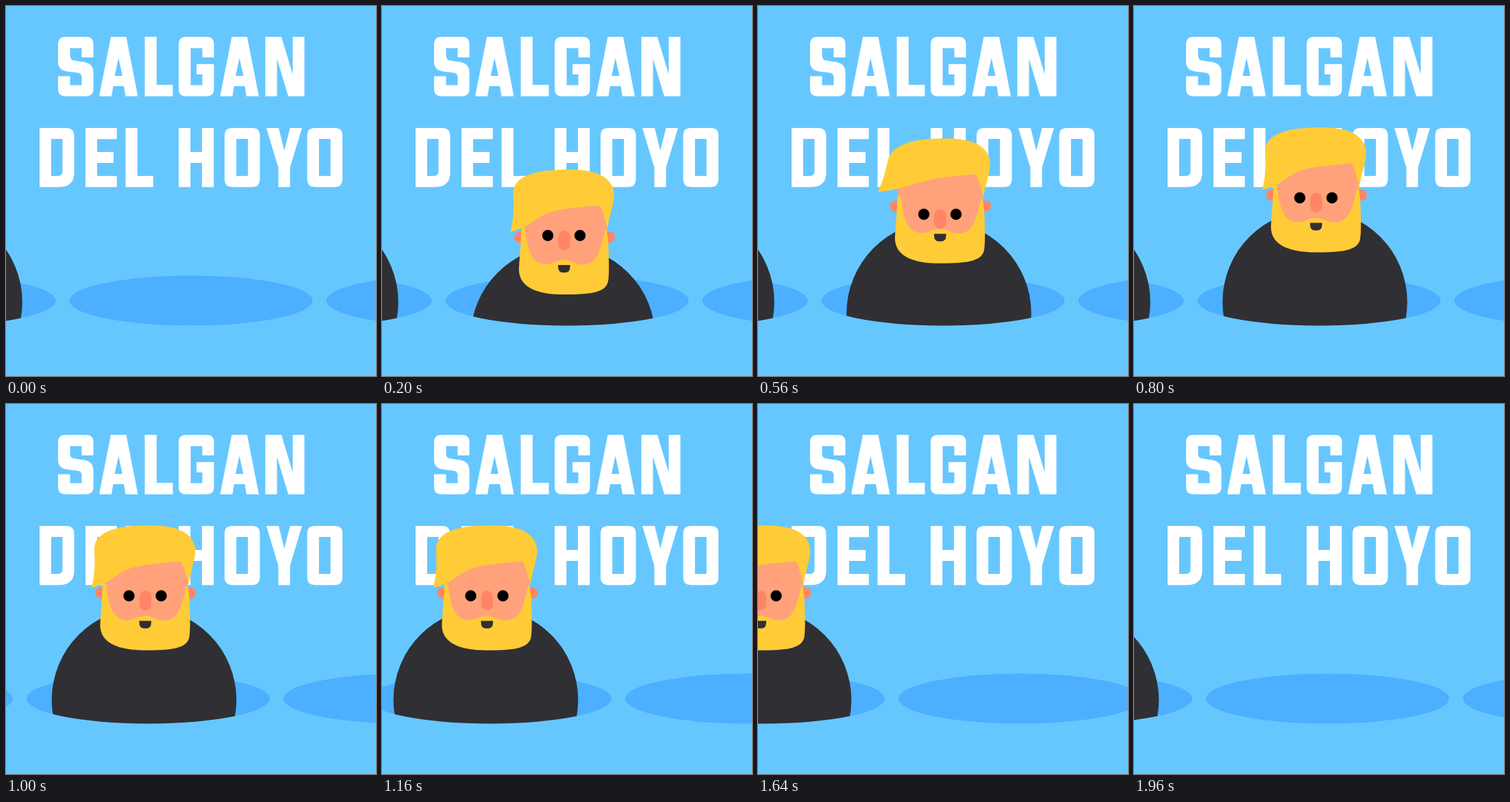
These frames come from a looping animation (540x540 px, 2000 ms). An HTML page:

```html
<!DOCTYPE html>
<html lang="es">
<head>
<meta charset="utf-8">
<title>Salgan del hoyo</title>
<style>
html, body { margin: 0; height: 100%; overflow: hidden; background: #66c7ff; }
svg { display: block; width: 100%; height: 100%; }
</style>
</head>
<body>
<svg viewBox="0 0 540 540" role="img" aria-label="SALGAN DEL HOYO">
  <defs>
    <clipPath id="rim"><path d="M92.5 430A177.5 36.5 0 0 0 447.5 430V0H92.5Z"/></clipPath>
    <ellipse id="hole" cx="270" cy="430" rx="177.5" ry="36.5" fill="#4cafff"/>
    <circle id="torso" cx="264" cy="432" r="134.800" fill="#302f34"/>
    <path id="A" d="M0 86.700L17 0H39.500L56.500 86.700H38.500L36 72H20.500L18 86.700ZM28.200 31L22.500 57H34Z"/>
    <path id="O" d="M330 178H359.500Q370.500 178 370.500 189V253Q370.500 264.200 359.500 264.200H330Q319 264.200 319 253V189Q319 178 330 178ZM336.200 194V248H353V194Z"/>
  </defs>

  <!-- Block lettering -->
  <g fill="#fff" fill-rule="evenodd">
    <path d="M87 45H116.500Q127.500 45 127.500 56V75H110.500V61.500H93.500V72Q93.500 78.500 99 79.500L114 81.800Q127.500 84 127.500 97V121Q127.500 131.700 116.500 131.700H87Q76 131.700 76 121V102.500H93.500V115.500H110.500V104Q110.500 98.500 105 97.500L89 95.500Q76 93.500 76 82V56Q76 45 87 45Z"/>
    <use href="#A" x="136" y="45"/>
    <path d="M202.500 45H219.800V115H243.500V131.700H202.500Z"/>
    <path d="M263 45H292.500Q303.500 45 303.500 56V75H286.500V61.500H269.500V115.500H286.500V99.800H278V84.800H303.500V121Q303.500 131.700 292.500 131.700H263Q252 131.700 252 121V56Q252 45 263 45Z"/>
    <use href="#A" x="312.500" y="45"/>
    <path d="M378.500 45H402L418.500 100V45H435.500V131.700H412L395.500 77V131.700H378.500Z"/>
    <path d="M49 178H88Q99.500 178 99.500 190V243Q99.500 264.200 78 264.200H49ZM66 194V248H76Q82.500 248 82.500 241V194Z"/>
    <path d="M116 178H161.800V194.200H133V213H157V229H133V248H161.800V264.200H116Z"/>
    <path d="M174.500 178H191.800V248H214.800V264.200H174.500Z"/>
    <path d="M252 178H269.200V213H286V178H303.200V264.200H286V229H269.200V264.200H252Z"/>
    <use href="#O"/>
    <path d="M380 178H398L406.200 211L414.500 178H432L414.500 236V264.200H397.500V236Z"/>
    <use href="#O" x="120.600"/>
  </g>

  <g id="world">
    <use href="#hole" x="-375"/>
    <use href="#hole"/>
    <use href="#hole" x="375"/>
    <use href="#hole" x="750"/>
    <g transform="translate(-375)"><g clip-path="url(#rim)"><use href="#torso"/></g></g>
    <g clip-path="url(#rim)">
      <use id="body" href="#torso"/>
      <g id="head">
        <g fill="#ff8566"><circle cx="201" cy="276" r="8.200"/><circle cx="331.800" cy="276" r="8.200"/></g>
        <path d="M203.500 200H328.500V320H203.500Z" fill="#ffa27b"/>
        <path fill="#ffcc37" d="M203.500 262H208.500C212 285 214 314 238 315.500C250 316 252 309 266 309.500C278 309.500 280 316 294 316C318 315 320 285 327 262L330 280C331 300 332 330 330 340C327 358 300 359.500 265 359.500C225 359.500 198 348 200 320C201 300 203 285 203.500 262Z"/>
        <path fill="#302f34" d="M257 316.500H274.500V319Q274.500 327.500 267.500 327.500H264Q257 327.500 257 319Z"/>
        <g id="features">
          <rect x="257.300" y="272.800" width="17.400" height="28.500" rx="8.500" fill="#ff8566"/>
          <circle cx="242" cy="280" r="8.200"/><circle cx="289" cy="280" r="8.200"/>
        </g>
        <path id="hair" fill="#ffcc37"/>
      </g>
    </g>
  </g>
</svg>
<script>
const $ = id => document.getElementById(id);
const LOOP = 2000, STEP = 40, PITCH = 375, SCROLL_START = 800;

// Each track is a list of [time, value], eased with a half cosine.
const BODY = [[40, 300], [280, -30], [520, 18], [740, 0]];
const HEAD = [[40, 300], [300, -52], [540, 16.5], [740, 0]];
const FACE = [[40, 0], [260, -8], [550, 8], [740, 0]];
const FRINGE = [[200, 0], [520, 1.05], [740, 0]];

function track(keys, t) {
  if (t <= keys[0][0]) return keys[0][1];
  for (let i = 1; i < keys.length; i++) {
    const [t0, a] = keys[i - 1], [t1, b] = keys[i];
    if (t < t1) return a + (b - a) * (1 - Math.cos(Math.PI * (t - t0) / (t1 - t0))) / 2;
  }
  return keys[keys.length - 1][1];
}

const move = (id, x, y) => $(id).setAttribute("transform", `translate(${x} ${y})`);

// k lifts the loose tip of the fringe outwards.
function hairPath(k) {
  const tip = `${187 - 13 * k} ${268 - 13 * k}`;
  return `M${tip}C${191 - 8 * k} ${255 - 17 * k} ${193 - 7 * k} ${235 - 12 * k} ${191.5 - 2 * k} ${216 - 7 * k}` +
    `C${189 + 4 * k} ${192 + 2 * k} 212 178 262 177.500C300 176 324 182 334 198` +
    `C345 216 334 232 329 263C326 254 324 240 317.500 229.500` +
    `C290 232 262 234 245 239.500C${225 - 3 * k} ${246 - 2 * k} ${212 - 8 * k} ${264 - 11 * k} ${tip}Z`;
}

function draw(now) {
  const t = Math.floor(now % LOOP / STEP) * STEP;
  const scroll = Math.max(0, t - SCROLL_START) / (LOOP - SCROLL_START);
  move("world", -PITCH * scroll, 0);
  move("body", 0, track(BODY, t));
  move("head", 0, track(HEAD, t));
  move("features", 0, track(FACE, t));
  $("hair").setAttribute("d", hairPath(track(FRINGE, t)));
}

const start = performance.now();
function tick() {
  draw(performance.now() - start);
  requestAnimationFrame(tick);
}
tick();
</script>
</body>
</html>
```
